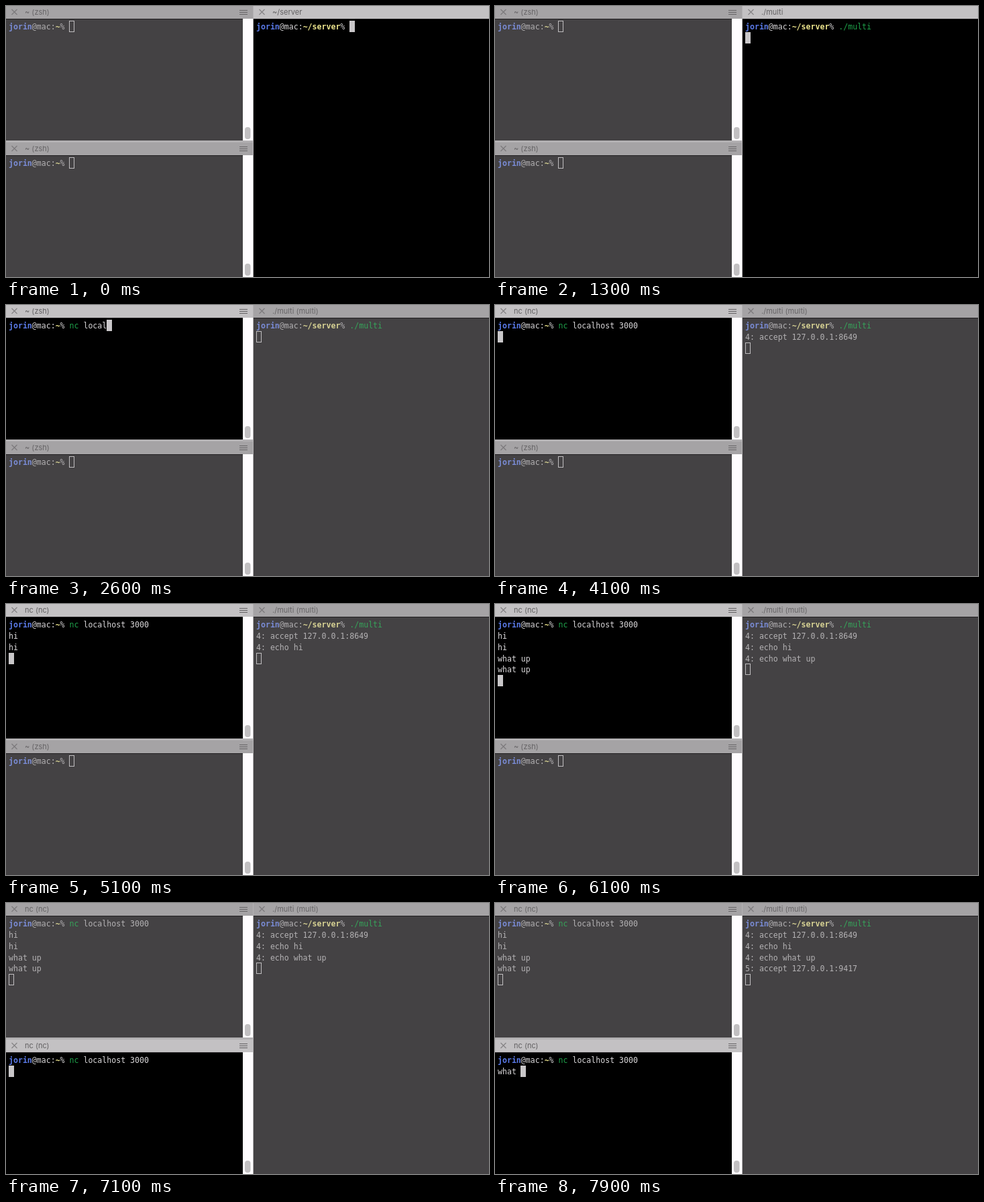
Recreate the animation shown at these times as an HTML page with a canvas. Size 720 by 405 pixels, loop 8 s.

```html
<!DOCTYPE html>
<html lang="en">
<head>
<meta charset="utf-8">
<title>Multi-client echo server</title>
<style>
  html, body { margin: 0; width: 100%; height: 100%; overflow: hidden; background: #000; }
  canvas { display: block; }
</style>
</head>
<body>
<canvas id="stage" width="720" height="405"></canvas>
<script>
const ctx = document.getElementById('stage').getContext('2d');
const LOOP = 8000, STEP = 100, BAR = 19, ROW = 16.85;
const FONT_SIZE = 11.57, CHAR = FONT_SIZE * 0.602;
const MONO = `${FONT_SIZE}px "DejaVu Sans Mono", monospace`;
const UI = '11px Inter, sans-serif';

const THEMES = {
  active: { bar: '#c3c1c3', body: '#000', title: '#626062', icon: '#858385',
            user: '#5b7bea', path: '#ece48c', cmd: '#1fa34b', text: '#dad8da' },
  idle:   { bar: '#a5a3a5', body: '#444244', title: '#666466', icon: '#7c7a7c',
            user: '#7a8cd6', path: '#d6d193', cmd: '#36a45a', text: '#b4b2b4' }
};

function rect(color, x, y, w, h) {
  ctx.fillStyle = color;
  ctx.fillRect(x, y, w, h);
}

function stroke(color, width, lines) {
  ctx.strokeStyle = color;
  ctx.lineWidth = width;
  ctx.beginPath();
  for (const [x1, y1, x2, y2] of lines) {
    ctx.moveTo(x1, y1);
    ctx.lineTo(x2, y2);
  }
  ctx.stroke();
}

// Each run is [start time, number of keys], one key per step.
function typed(text, t, runs) {
  let n = 0;
  for (const [start, count] of runs) {
    n += Math.max(0, Math.min(count, Math.floor((t - start) / STEP) + 1));
  }
  return text.slice(0, n);
}

const plain = text => [[text, 'text']];
const prompt = (path, cmd, args = '') => [
  ['jorin', 'user'], ['@mac:', 'text'], [path, 'path'],
  ['% ', 'text'], [cmd, 'cmd'], [args, 'text']
];

function drawLine(line, x, y, theme) {
  for (const [text, kind] of line) {
    ctx.font = (kind === 'user' || kind === 'path' ? 'bold ' : '') + MONO;
    ctx.fillStyle = theme[kind];
    ctx.fillText(text, x, y);
    x += text.length * CHAR;
  }
  return x;
}

function drawScrollbar(theme, y, h) {
  stroke(theme.title, 1, [-3, 0, 3].map(d => [348, y + 9.5 + d, 360, y + 9.5 + d]));
  rect('#fefcfe', 353, y + BAR, 15, h - BAR);
  ctx.fillStyle = '#c1bfc1';
  ctx.beginPath();
  ctx.roundRect(356, y + h - 20, 8.5, 18, 4);
  ctx.fill();
}

function drawCursor(x, y, active) {
  x = Math.round(x - 0.5);
  y = Math.round(y);
  if (active) {
    rect('#c9c7c9', x, y, 8, 17);
  } else {
    ctx.strokeStyle = '#c0bec0';
    ctx.lineWidth = 1;
    ctx.strokeRect(x + 0.5, y + 0.5, 7, 16);
  }
}

function drawPane({ x, y, w, h, title, lines, active, side }) {
  const theme = THEMES[active ? 'active' : 'idle'];
  rect(theme.bar, x, y, w, BAR);
  rect(theme.body, x, y + BAR, w, h - BAR);
  rect('#222022', x, y + BAR, w, 1);

  const cx = x + 12.5, cy = y + 9;
  stroke(theme.icon, 1.2, [[cx - 4, cy - 4, cx + 4, cy + 4], [cx - 4, cy + 4, cx + 4, cy - 4]]);
  ctx.font = UI;
  ctx.fillStyle = theme.title;
  ctx.fillText(title, x + 28, y + 13);
  if (side) drawScrollbar(theme, y, h);

  const left = x + 4;
  let end = left;
  lines.forEach((line, i) => {
    end = drawLine(line, left, y + 35 + i * ROW, theme);
  });
  drawCursor(end, y + 22 + (lines.length - 1) * ROW, active);
}

function serverPane(t) {
  const lines = [prompt('~/server', typed('./multi', t, [[200, 7]]))];
  const log = [[4100, '4: accept 127.0.0.1:8649'], [4700, '4: echo hi'],
               [6000, '4: echo what up'], [7200, '5: accept 127.0.0.1:9417']];
  for (const [at, text] of log) if (t >= at) lines.push(plain(text));
  if (t >= 1000) lines.push(plain(''));
  return {
    x: 369, y: 0, w: 351, h: 405, lines, active: t < 1400,
    title: t < 1000 ? '~/server' : t < 1400 ? './multi' : './multi (multi)'
  };
}

function firstClient(t) {
  const input = typed('nc localhost 3000', t, [[1500, 3], [1900, 3], [2500, 2], [2900, 3], [3500, 6]]);
  const lines = [prompt('~', input.slice(0, 2), input.slice(2))];
  if (t >= 4100) lines.push(plain(typed('hi', t, [[4300, 2]])));
  if (t >= 4700) lines.push(plain('hi'));
  if (t >= 4600) lines.push(plain(typed('what up', t, [[5200, 7]])));
  if (t >= 6000) lines.push(plain('what up'));
  if (t >= 5900) lines.push(plain(''));
  return {
    x: 0, y: 0, w: 368, h: 201, lines, side: true,
    active: t >= 1400 && t < 6300, title: t < 4100 ? '~ (zsh)' : 'nc (nc)'
  };
}

function secondClient(t) {
  const recalled = t >= 6700;
  const lines = [prompt('~', recalled ? 'nc' : '', recalled ? ' localhost 3000' : '')];
  if (t >= 7100) lines.push(plain(typed('what ', t, [[7400, 5]])));
  return {
    x: 0, y: 204, w: 368, h: 201, lines, side: true,
    active: t >= 6300, title: t < 7100 ? '~ (zsh)' : 'nc (nc)'
  };
}

function draw() {
  const t = performance.now() % LOOP;
  rect('#b3b1b3', 0, 0, 720, 405);
  [firstClient(t), secondClient(t), serverPane(t)].forEach(drawPane);
  requestAnimationFrame(draw);
}

draw();
</script>
</body>
</html>
```
